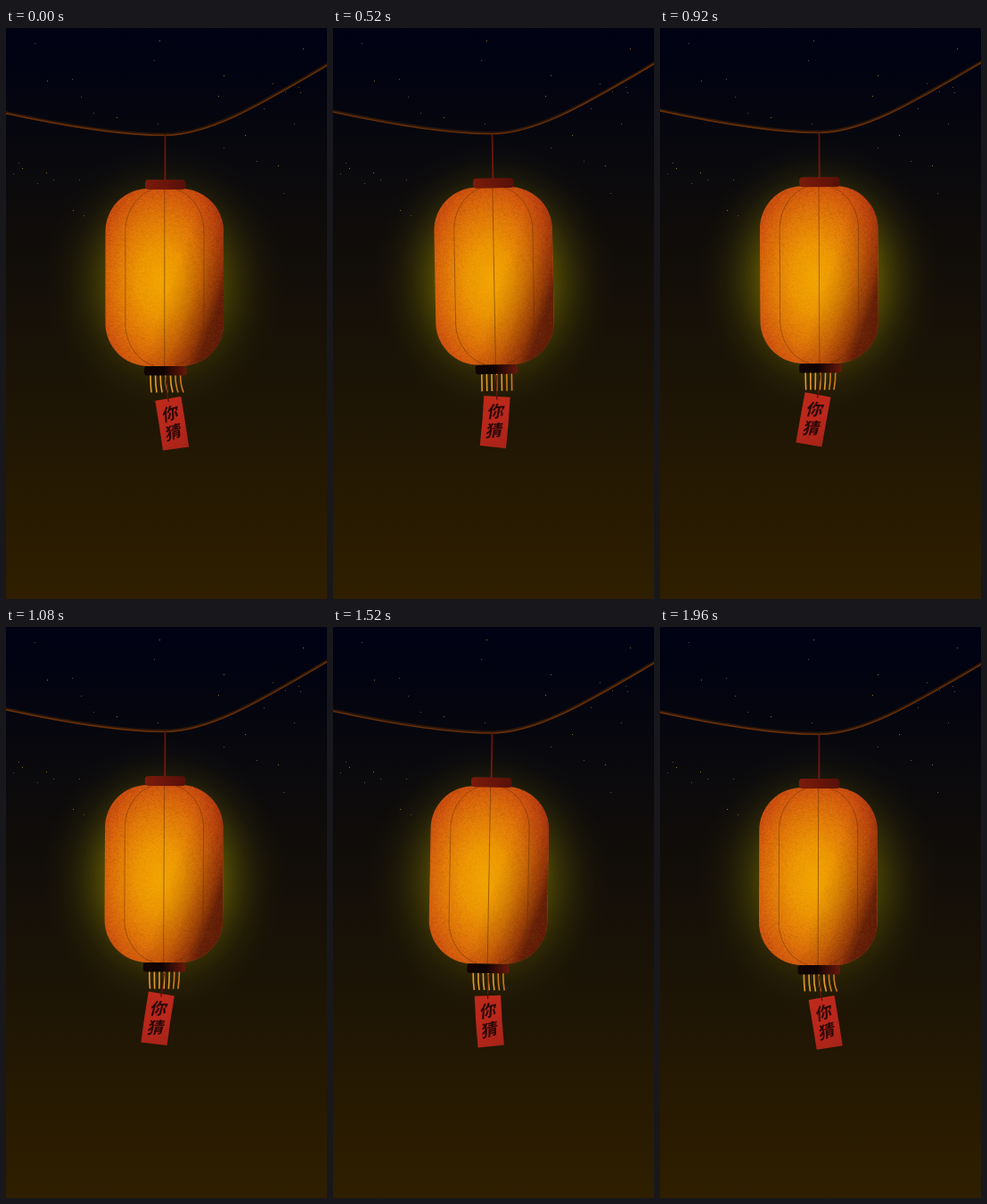
Write an HTML page with a canvas that moves like this. It is 360 px wide and 640 px high and loops after 2 s.

```html
<!DOCTYPE html>
<html lang="zh">
<head>
<meta charset="utf-8">
<title>Lantern</title>
<style>
html, body { margin: 0; width: 100%; height: 100%; overflow: hidden; background: #000; }
canvas { display: block; width: 360px; height: 640px; }
</style>
</head>
<body>
<canvas id="stage" width="360" height="640"></canvas>
<script>
const LOOP = 2000, STEP = 40, DEG = Math.PI / 180;
const ctx = document.getElementById('stage').getContext('2d');
const STARS = [
  [172, 14], [166, 36], [74, 57], [46, 59], [84, 77], [98, 95], [238, 76], [313, 71],
  [330, 72], [333, 23], [328, 66], [299, 62], [244, 53], [53, 170], [82, 170], [18, 157],
  [8, 163], [14, 151], [45, 162], [35, 174], [311, 185], [305, 154], [281, 149], [244, 134],
  [268, 120], [170, 107], [87, 210], [75, 204], [289, 90], [323, 107], [124, 100], [32, 17]
];
const BODY = { x: 111.5, y: 180, w: 132.5, h: 199, r: 48 };

function random(seed) {
  return () => {
    seed = (seed * 1664525 + 1013904223) >>> 0;
    return seed / 4294967296;
  };
}

function blend(g, stops) {
  stops.forEach(([at, color]) => g.addColorStop(at, color));
  return g;
}
const linear = (c, x0, y0, x1, y1, stops) => blend(c.createLinearGradient(x0, y0, x1, y1), stops);
const radial = (c, r, stops) => blend(c.createRadialGradient(0, 0, 0, 0, 0, r), stops);

function layer(w, h, paint) {
  const c = document.createElement('canvas');
  c.width = w;
  c.height = h;
  paint(c.getContext('2d'));
  return c;
}

const sky = layer(360, 640, c => {
  c.fillStyle = linear(c, 0, 0, 0, 640, [
    [0, '#000113'], [0.08, '#020311'], [0.19, '#07070e'], [0.31, '#0d0b0b'],
    [0.47, '#140f08'], [0.62, '#1b1406'], [0.78, '#241802'], [1, '#2f1f00']
  ]);
  c.fillRect(0, 0, 360, 640);
  STARS.forEach(([x, y], i) => {
    c.fillStyle = i % 3 ? 'rgba(150,130,75,.6)' : 'rgba(190,135,50,.75)';
    c.fillRect(x, y, 1, 1);
  });
});

const grain = layer(133, 199, c => {
  const rnd = random(7);
  for (let y = 0; y < 199; y++) {
    for (let x = 0; x < 133; x++) {
      const edge = Math.min(1, Math.hypot((x - 62) / 70, (y - 104) / 110));
      const a = rnd() * (0.03 + 0.13 * edge);
      c.fillStyle = rnd() < 0.6 ? `rgba(90,15,0,${a})` : `rgba(255,150,40,${a * 0.6})`;
      c.fillRect(x, y, 1, 1);
    }
  }
});

// Cosine of the loop phase, shifted by a lead in ms
const wave = (t, lead) => Math.cos((t + lead) / LOOP * 2 * Math.PI);

function box(x, y, w, h, r, fill) {
  ctx.beginPath();
  ctx.roundRect(x, y, w, h, r);
  ctx.fillStyle = fill;
  ctx.fill();
}

function line(width, color, draw) {
  ctx.beginPath();
  draw();
  ctx.lineWidth = width;
  ctx.strokeStyle = color;
  ctx.stroke();
}

function rope() {
  const curve = shift => () => {
    ctx.moveTo(-2, 94.5 + shift);
    ctx.bezierCurveTo(60, 108 + shift, 130, 119.5 + shift, 178, 119.5 + shift);
    ctx.bezierCurveTo(230, 119.5 + shift, 290, 82 + shift, 362, 40 + shift);
  };
  line(3.4, '#2c1708', curve(0));
  line(1.3, '#6b3009', curve(0.8));
}

function glow(power) {
  ctx.save();
  ctx.translate(178, 283);
  ctx.scale(1, 1.14);
  const tone = a => `rgba(120,111,0,${a * power})`;
  ctx.fillStyle = radial(ctx, 136, [
    [0, tone(0.8)], [0.48, tone(0.64)], [0.58, tone(0.42)], [0.68, tone(0.24)],
    [0.78, tone(0.11)], [0.89, tone(0.035)], [1, tone(0)]
  ]);
  ctx.fillRect(-140, -140, 280, 280);
  ctx.restore();
}

function body() {
  const { x, y, w, h, r } = BODY;
  ctx.save();
  ctx.beginPath();
  ctx.roundRect(x, y, w, h, r);
  ctx.clip();
  ctx.save();
  ctx.translate(173, 284);
  ctx.scale(1, 1.5);
  ctx.fillStyle = radial(ctx, 82, [
    [0, '#f3a602'], [0.3, '#f09a03'], [0.6, '#e37a08'], [0.84, '#d4590e'], [1, '#c54511']
  ]);
  ctx.fillRect(-90, -90, 180, 180);
  ctx.restore();
  ctx.fillStyle = linear(ctx, 190, 270, 246, 290, [
    [0, 'rgba(90,15,4,0)'], [0.45, 'rgba(90,15,4,.2)'], [0.8, 'rgba(80,14,5,.5)'], [1, 'rgba(55,9,5,.72)']
  ]);
  ctx.fillRect(x, y, w, h);
  ctx.drawImage(grain, x, y);
  ctx.restore();

  const ink = 'rgba(95,50,5,.62)';
  line(0.9, ink, () => {
    ctx.moveTo(177.8, 180);
    ctx.lineTo(177.8, 379);
  });
  [[133.8, 166], [222, 190]].forEach(([side, inner]) => line(0.8, ink, () => {
    const bow = side + (inner - side) * 0.12;
    ctx.moveTo(inner, 180.5);
    ctx.bezierCurveTo(bow + (inner - bow) * 0.4, 185, side, 204, side, 228);
    ctx.lineTo(side, 331);
    ctx.bezierCurveTo(side, 355, bow + (inner - bow) * 0.4, 374, inner, 378.5);
  }));
}

function caps() {
  box(156, 170, 45.5, 11, 4, linear(ctx, 156, 0, 201, 0, [[0, '#7a1c0b'], [0.5, '#6b150a'], [1, '#561008']]));
  box(155, 379, 47.5, 10.5, 3, linear(ctx, 155, 0, 202, 0, [
    [0, '#120504'], [0.45, '#0e0403'], [0.62, '#2d0a06'], [1, '#66190b']
  ]));
}

function tassel(t) {
  const bend = 0.8 + 1.6 * wave(t, 150), fan = 0.4 * wave(t, 0);
  for (let i = -3; i <= 3; i++) {
    const x = 178.8 + i * 5.6;
    line(1.6, i > 1 ? '#cf7a1a' : '#e39a2a', () => {
      ctx.moveTo(x, 389.5);
      ctx.quadraticCurveTo(x, 400, x + bend + fan * i, 408.5);
    });
  }
}

function glyph(text, y, turn, x) {
  ctx.save();
  ctx.translate(x, y);
  ctx.rotate(turn);
  ctx.transform(1, -0.16, -0.1, 1, 0, 0);
  ctx.fillText(text, 0, 0);
  ctx.restore();
}

function tag(t, sway, dy) {
  const x = 178.7 + 263 * Math.sin(sway) + 3.2 * wave(t, -80);
  const y = 413.2 + dy + 0.7 * wave(t, 0);
  const turn = (0.4 - 10 * wave(t, 120)) * DEG;
  const curl = -2 * wave(t, 620) * DEG;
  const w = 14.7, h = 56.8, bulge = h * curl / 4;

  line(1.2, '#6b170c', () => {
    ctx.moveTo(178.8 + 268 * Math.sin(sway), 389 + dy);
    ctx.lineTo(x, y + 3);
  });
  ctx.save();
  ctx.translate(x, y);
  ctx.rotate(turn);
  const corner = (u, v) => {
    const a = v ? curl : -curl;
    return [u * w * Math.cos(a), v * h + u * w * Math.sin(a)];
  };
  const [tl, tr, br, bl] = [corner(-1, 0), corner(1, 0), corner(1, 1), corner(-1, 1)];
  ctx.beginPath();
  ctx.moveTo(...tl);
  ctx.lineTo(...tr);
  ctx.quadraticCurveTo(w + bulge * 2, h / 2, ...br);
  ctx.lineTo(...bl);
  ctx.quadraticCurveTo(-w + bulge * 2, h / 2, ...tl);
  ctx.fillStyle = linear(ctx, -w, 0, w, h, [[0, '#bd2a1b'], [0.5, '#b9271b'], [1, '#a62318']]);
  ctx.fill();
  line(1.2, '#4a0d08', () => {
    ctx.moveTo(0, -1);
    ctx.lineTo(0, 3.5);
  });
  ctx.fillStyle = '#2a0806';
  ctx.font = '900 18.5px "Noto Sans CJK SC", "Noto Sans CJK", "Noto Sans CJK JP", sans-serif';
  ctx.textAlign = 'center';
  ctx.textBaseline = 'middle';
  glyph('你', 16.5, -curl * 0.4, bulge * 0.6);
  glyph('猜', 38, curl * 0.4, bulge * 0.6);
  ctx.restore();
}

function draw(t) {
  const dy = 1.5 * wave(t, 0) - 1.5;
  const sway = 1.02 * DEG * wave(t, -LOOP / 4);
  ctx.drawImage(sky, 0, 0);
  ctx.save();
  ctx.translate(178.5, 120 + dy);
  ctx.rotate(-sway);
  ctx.translate(-178.5, -120);
  glow(0.87 - 0.13 * wave(t, 150));
  ctx.restore();

  ctx.save();
  ctx.translate(0, dy);
  rope();
  ctx.translate(178.5, 120);
  ctx.rotate(-sway);
  ctx.translate(-178.5, -120);
  line(1.8, linear(ctx, 0, 120, 0, 170, [[0, '#5c1408'], [1, '#7d170b']]), () => {
    ctx.moveTo(178.5, 120);
    ctx.lineTo(178.5, 171);
  });
  body();
  caps();
  tassel(t);
  ctx.restore();
  tag(t, sway, dy + 1.5);
}

function tick() {
  const t = performance.now() % LOOP;
  draw(Math.floor(t / STEP) * STEP);
  requestAnimationFrame(tick);
}
tick();
</script>
</body>
</html>
```
